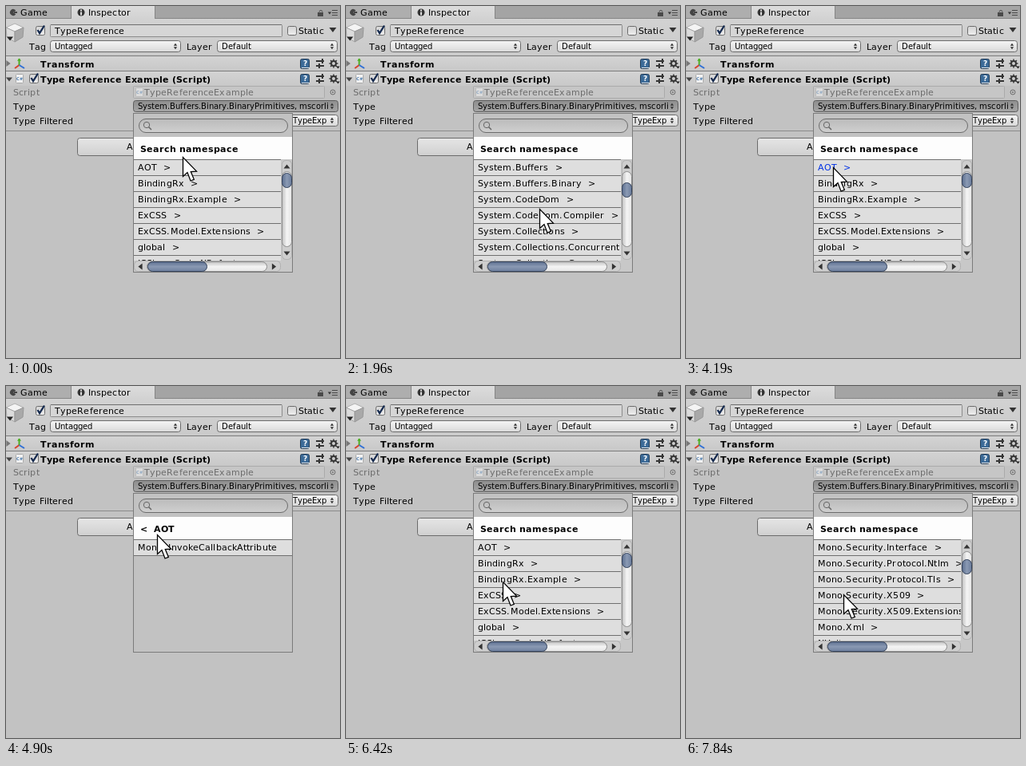
An HTML page with a canvas that plays this animation: 418x441 px, repeating every 7.99 s.

```html
<!DOCTYPE html>
<html lang="en">
<head>
<meta charset="utf-8">
<title>Type reference inspector</title>
<style>
html, body { margin: 0; width: 100%; height: 100%; overflow: hidden; background: #c2c2c2; }
canvas { display: block; width: 418px; height: 441px; }
</style>
</head>
<body>
<canvas id="stage" width="418" height="441"></canvas>
<script>
const ctx = document.getElementById('stage').getContext('2d');
const LOOP = 7990;

const under = (root, names) => names.split(' ').map(n => root + '.' + n);
const NAMESPACES = [
  'AOT', 'BindingRx', 'BindingRx.Example', 'ExCSS', 'ExCSS.Model.Extensions', 'global',
  'ICSharpCode.NRefactory',
  ...under('ICSharpCode.NRefactory', 'Ast AstBuilder Parser Parser.CSharp Parser.VB PrettyPrinter Visitors'),
  ...under('JetBrains', 'Annotations Platform.Unity.EditorPluginModel Rider.Unity.Editor'),
  ...under('JetBrains.Rider.Unity.Editor', 'AssetPostprocessors NonUnity Util'),
  ...under('Microsoft', 'CSharp Win32 Win32.SafeHandles'),
  'Mono', ...under('Mono', 'Globalization.Unicode Math Math.Prime Security'),
  ...under('Mono.Security', 'Authenticode Cryptography Interface Protocol.Ntlm Protocol.Tls X509 X509.Extensions'),
  'Mono.Xml', 'NUnit', ...under('NUnit', 'Compatibility Framework'),
  ...under('NUnit.Framework', 'Api Constraints Interfaces Internal Internal.Builders Internal.Commands Internal.Execution Internal.Filters'),
  'System', ...under('System', 'Buffers Buffers.Binary CodeDom CodeDom.Compiler Collections Collections.Concurrent Collections.Generic Collections.ObjectModel ComponentModel Configuration'),
  ...under('System.Configuration', 'Assemblies Internal Provider'),
  ...under('System', 'Deployment.Internal Diagnostics Diagnostics.CodeAnalysis Diagnostics.Contracts')
];

// Moves: first step (ms), last step (ms), steps, then pointer x, y and top row reached.
const START = [222, 189, 0];
const MOVES = [
  [150, 430, 3, 243, 254, 15],
  [710, 710, 1, 243, 254, 18],
  [1010, 1140, 2, 243, 254, 27],
  [1540, 2230, 6, 243, 254, 57],
  [2370, 2510, 2, 344, 222, 57],
  [2660, 2660, 1, 347, 213, 57],
  [2940, 3210, 3, 347, 181, 0],
  [3350, 3610, 3, 216, 204, 0],
  [3760, 3910, 2, 185, 202, 0],
  [4750, 5030, 3, 192, 178, 0],
  [5330, 5330, 1, 200, 180, 0],
  [5880, 6140, 3, 205, 212, 0],
  [6280, 6540, 3, 193, 262, 0],
  [6810, 7290, 5, 193, 262, 21],
  [7560, 7840, 3, 198, 261, 30]
];
const within = (t, a, b) => t >= a && t < b;

function stateAt(t) {
  let from = START;
  for (const [a, b, n, ...to] of MOVES) {
    if (t < a) break;
    const gap = n > 1 ? (b - a) / (n - 1) : 1;
    const k = Math.min(n, Math.floor((t - a) / gap + 1e-6) + 1) / n;
    from = from.map((v, i) => v + (to[i] - v) * k);
    if (k < 1) break;
  }
  return {
    x: Math.round(from[0]), y: Math.round(from[1]),
    row: Math.round(from[2] / 3) * 3,
    ring: within(t, 2790, 3350) || within(t, 4340, 4750) || within(t, 5470, 5600),
    pressed: within(t, 4190, 4340),
    inside: within(t, 4340, 5470)
  };
}

// Glyphs snap to whole pixels, as in the editor's hinted text.
const advances = {};
function text(s, x, y, { size = 11, bold = false, color = '#000' } = {}) {
  ctx.font = `${bold ? 'bold ' : ''}${size}px "DejaVu Sans", sans-serif`;
  ctx.fillStyle = color;
  const tracking = size === 11 && !bold ? .1 : 0;
  for (const c of s) {
    const key = ctx.font + c;
    advances[key] ??= Math.round(ctx.measureText(c).width + (bold ? .1 : .02));
    ctx.fillText(c, Math.round(x), y);
    x += advances[key] + tracking;
  }
}

function rect(x, y, w, h, color) {
  ctx.fillStyle = color;
  ctx.fillRect(x, y, w, h);
}

function paint(fill, stroke, width = 1) {
  if (fill) { ctx.fillStyle = fill; ctx.fill(); }
  if (stroke) { ctx.lineWidth = width; ctx.strokeStyle = stroke; ctx.stroke(); }
}

function box(x, y, w, h, r, fill, stroke) {
  ctx.beginPath();
  ctx.roundRect(x + .5, y + .5, w - 1, h - 1, r);
  paint(fill, stroke);
}

function poly(points, fill, stroke, width) {
  ctx.beginPath();
  points.forEach(([x, y]) => ctx.lineTo(x, y));
  ctx.closePath();
  paint(fill, stroke, width);
}

function line(points, color, width) {
  ctx.beginPath();
  points.forEach(([x, y]) => ctx.lineTo(x, y));
  paint(null, color, width);
}

function circle(x, y, r, fill, stroke, width) {
  ctx.beginPath();
  ctx.arc(x, y, r, 0, 7);
  paint(fill, stroke, width);
}

function fade(x0, y0, x1, y1, ...colors) {
  const g = ctx.createLinearGradient(x0, y0, x1, y1);
  colors.forEach((c, i) => g.addColorStop(i / (colors.length - 1), c));
  return g;
}
const fadeDown = (y, h, ...colors) => fade(0, y, 0, y + h, ...colors);

// Triangle pointing along (dx, dy), with a base of 2r.
function arrow(x, y, dx, dy, r = 4, color = '#333') {
  const d = r * .65;
  poly([[x + dx * d, y + dy * d],
    [x - dx * d + dy * r, y - dy * d + dx * r],
    [x - dx * d - dy * r, y - dy * d - dx * r]], color);
}

function updown(x, y) {
  arrow(x, y - 2.3, 0, -1, 2.2);
  arrow(x, y + 2.3, 0, 1, 2.2);
}

function check(x, y, on) {
  box(x, y, 12, 12, 2, fadeDown(y, 12, '#d2d2d2', '#f0f0f0'), '#6c6c6c');
  if (on) line([[x + 2.5, y + 5], [x + 5, y + 9], [x + 11, y - .5]], '#14294e', 2.3);
}

function popup(x, y, w, h) {
  box(x, y, w, h, 3, fadeDown(y, h, '#f6f6f6', '#d8d8d8'), '#6b6b6b');
}

function tabs() {
  const edge = '#858585';
  rect(0, 0, 418, 16, '#a4a4a4');
  rect(0, 0, 81, 15, '#aeaeae');
  rect(0, 15, 418, 1, edge);
  rect(81, 0, 105, 16, fadeDown(0, 16, '#dcdcdc', '#d2d2d2'));
  rect(81, 0, 1, 16, edge);
  rect(186, 0, 1, 16, edge);
  ctx.beginPath();
  ctx.arc(9, 8, 4, .6, 5.7);
  ctx.lineTo(9, 8);
  ctx.closePath();
  paint('#444');
  rect(10, 7, 4, 2, '#444');
  text('Game', 18, 12);
  circle(94, 8, 4.5, '#333');
  rect(93, 4.5, 2, 2, '#ddd');
  rect(93, 7.5, 2, 4, '#ddd');
  text('Inspector', 103, 12);
  ctx.beginPath();
  ctx.arc(394, 7.5, 2, Math.PI, 0);
  paint(null, '#4a4a4a');
  rect(390, 8, 7, 5, '#4a4a4a');
  arrow(405, 9, 0, 1, 2.2);
  for (const y of [5, 8, 11]) rect(408, y, 7, 1, '#4a4a4a');
}

function objectHeader() {
  rect(0, 16, 418, 46, fadeDown(16, 46, '#d2d2d2', '#cacaca'));
  poly([[11, 22], [22, 27], [11, 32], [0, 27]], '#f4f4f4', '#b0b0b0');
  poly([[0, 27], [11, 32], [11, 45], [1, 39]], '#dcdcdc', '#a6a6a6');
  poly([[22, 27], [11, 32], [11, 45], [21, 39]], '#a9a9a9', '#989898');
  arrow(5, 41, 0, 1, 4, '#222');
  check(37, 25, true);
  box(55, 23, 291, 16, 1, '#d6d6d6', '#8b8b8b');
  rect(56, 23, 289, 1, '#6f6f6f');
  text('TypeReference', 61, 35);
  check(352, 25, false);
  text('Static', 366, 35);
  arrow(409, 30, 0, 1, 4.5);
  text('Tag', 29, 55);
  popup(55, 43, 164, 15);
  text('Untagged', 61, 54, { size: 10 });
  updown(212, 50.5);
  text('Layer', 226, 55);
  popup(264, 43, 151, 15);
  text('Default', 270, 54, { size: 10 });
  updown(408, 50.5);
}

function componentBar(y, title) {
  rect(0, y, 418, 19, fadeDown(y, 19, '#d4d4d4', '#c8c8c8'));
  rect(0, y, 418, 1, '#7c7c7c');
  text(title, 43, y + 15, { bold: true });

  box(368, y + 4, 12, 13, 2, '#3d6b98', '#223c58');
  rect(370, y + 15, 10, 1, '#e8e8e8');
  text('?', 372, y + 13, { size: 9, bold: true, color: '#fff' });

  const ink = '#333';
  rect(388, y + 6, 10, 2, ink);
  rect(388, y + 12, 10, 2, ink);
  rect(395, y + 4, 2, 6, ink);
  rect(391, y + 10, 2, 6, ink);

  const cy = y + 10;
  circle(410, cy, 3, null, ink, 2);
  for (let a = 0; a < 8; a++) {
    const c = Math.cos(a * Math.PI / 4), s = Math.sin(a * Math.PI / 4);
    line([[410 + c * 3.5, cy + s * 3.5], [410 + c * 5.5, cy + s * 5.5]], ink, 1.5);
  }
  arrow(415.5, y + 15, 0, 1, 2.2, '#222');
}

function scriptIcon(x, y, alpha) {
  ctx.globalAlpha = alpha;
  box(x, y, 10, 12, 1, '#f2f2f2', '#a8a8a8');
  text('C#', x + 1, y + 8, { size: 5, bold: true, color: '#3a6ea5' });
  ctx.globalAlpha = 1;
}

function components() {
  componentBar(62, 'Transform');
  arrow(3, 72, 1, 0, 4, '#777');
  line([[16.5, 74], [16.5, 66]], '#4cae22', 2);
  line([[16.5, 74], [11, 78]], '#d8432c', 2);
  line([[16.5, 74], [23, 78]], '#2f6fd6', 2);
  arrow(16.5, 67, 0, -1, 2.5, '#4cae22');

  componentBar(81, 'Type Reference Example (Script)');
  arrow(4, 92, 0, 1, 4, '#444');
  scriptIcon(12, 85, 1);
  check(29, 85, true);
  rect(0, 100, 418, 58, '#c2c2c2');

  const dim = '#6c6c6c';
  text('Script', 9, 112, { color: dim });
  box(159, 100, 240, 16, 1, '#c6c6c6', '#aaa');
  scriptIcon(162, 102, .5);
  text('TypeReferenceExample', 173, 112, { color: dim });
  circle(409, 108, 3, null, dim);
  circle(409, 108, 1, dim);

  text('Type', 9, 130);
  box(159, 118, 257, 15, 3, fadeDown(118, 15, '#8d8d8d', '#a6a6a6'), '#5c5c5c');
  text('System.Buffers.Binary.BinaryPrimitives, mscorli', 165, 129, { size: 10 });
  updown(408, 125.5);

  text('Type Filtered', 9, 148);
  popup(159, 136, 257, 15);
  text('TypeExp', 359, 147, { size: 10 });
  updown(408, 143.5);

  rect(0, 156, 418, 1, '#8a8a8a');
  box(89, 165, 240, 23, 3, fadeDown(165, 23, '#e6e6e6', '#cfcfcf'), '#6b6b6b');
  text('Add Component', 151, 180);
}

function scrollbars(row) {
  const well = '#8c8c8c', rim = '#33415a';
  const groove = ['#bdbdbd', '#f4f4f4', '#e4e4e4'];
  const thumb = ['#586b8c', '#8a99b3', '#6a7c9b'];
  rect(344, 192, 14, 127, '#c8c8c8');
  box(345, 193, 13, 125, 5, '#cecece', '#b0b0b0');
  box(345, 207, 13, 95, 6, fade(345, 0, 358, 0, ...groove), well);
  arrow(351.5, 201, 0, -1);
  arrow(351.5, 310, 0, 1);
  box(345, 209 + Math.round(row / 4), 13, 19, 6, fade(345, 0, 358, 0, ...thumb), rim);

  rect(160, 319, 198, 14, '#c8c8c8');
  box(160, 319, 184, 14, 5, '#cecece', '#b0b0b0');
  box(176, 320, 151, 13, 6, fadeDown(320, 13, ...groove), well);
  arrow(168, 326.5, -1, 0);
  arrow(335.5, 326.5, 1, 0);
  box(177, 320, 75, 13, 6, fadeDown(320, 13, ...thumb), rim);
}

function listRow(label, y, right, color) {
  rect(160, y, right - 160, 20, '#dedede');
  rect(160, y, right - 160, 1, '#6f6f6f');
  text(label, 165, y + 14, { color });
}

function dropdown({ row, pressed, inside }) {
  rect(159, 134, 200, 200, '#7b7b7b');
  rect(160, 135, 198, 198, '#c2c2c2');
  box(166, 141, 187, 18, 9, fadeDown(141, 18, '#bababa', '#d0d0d0'), '#6b6b6b');
  circle(176, 149, 3.7, null, '#666');
  line([[178.5, 151.5], [182, 155]], '#666', 1.5);
  rect(160, 164, 198, 28, '#fdfdfd');
  text(inside ? '<  AOT' : 'Search namespace', 168, 183, { bold: true });

  ctx.save();
  ctx.beginPath();
  ctx.rect(160, 192, inside ? 198 : 184, 127);
  ctx.clip();
  if (inside) {
    listRow('MonoPInvokeCallbackAttribute', 192, 358, '#000');
    rect(160, 212, 198, 1, '#6f6f6f');
  } else {
    NAMESPACES.slice(row, row + 7).forEach((name, i) =>
      listRow(name + '  >', 192 + i * 20, 344, pressed && i === 0 ? '#0032e6' : '#000'));
  }
  ctx.restore();
  if (!inside) scrollbars(row);
}

function pointer({ x, y, ring }) {
  if (ring) circle(x + 1, y + 1, 9.5, 'rgba(255,255,255,.25)', '#444', 1.2);
  ctx.save();
  ctx.translate(x - .5, y + .5);
  poly([[0, 0], [0, 24], [5.5, 19], [9.5, 29.5], [13.8, 27.8], [9.8, 18], [17, 17.6]], '#fff', '#000', 1.3);
  ctx.restore();
}

let shown = '';
function draw(now) {
  const state = stateAt(now % LOOP);
  const key = JSON.stringify(state);
  if (key !== shown) {
    shown = key;
    rect(0, 0, 418, 441, '#c2c2c2');
    tabs();
    objectHeader();
    components();
    dropdown(state);
    pointer(state);
  }
  requestAnimationFrame(draw);
}
draw(0);
</script>
</body>
</html>
```
